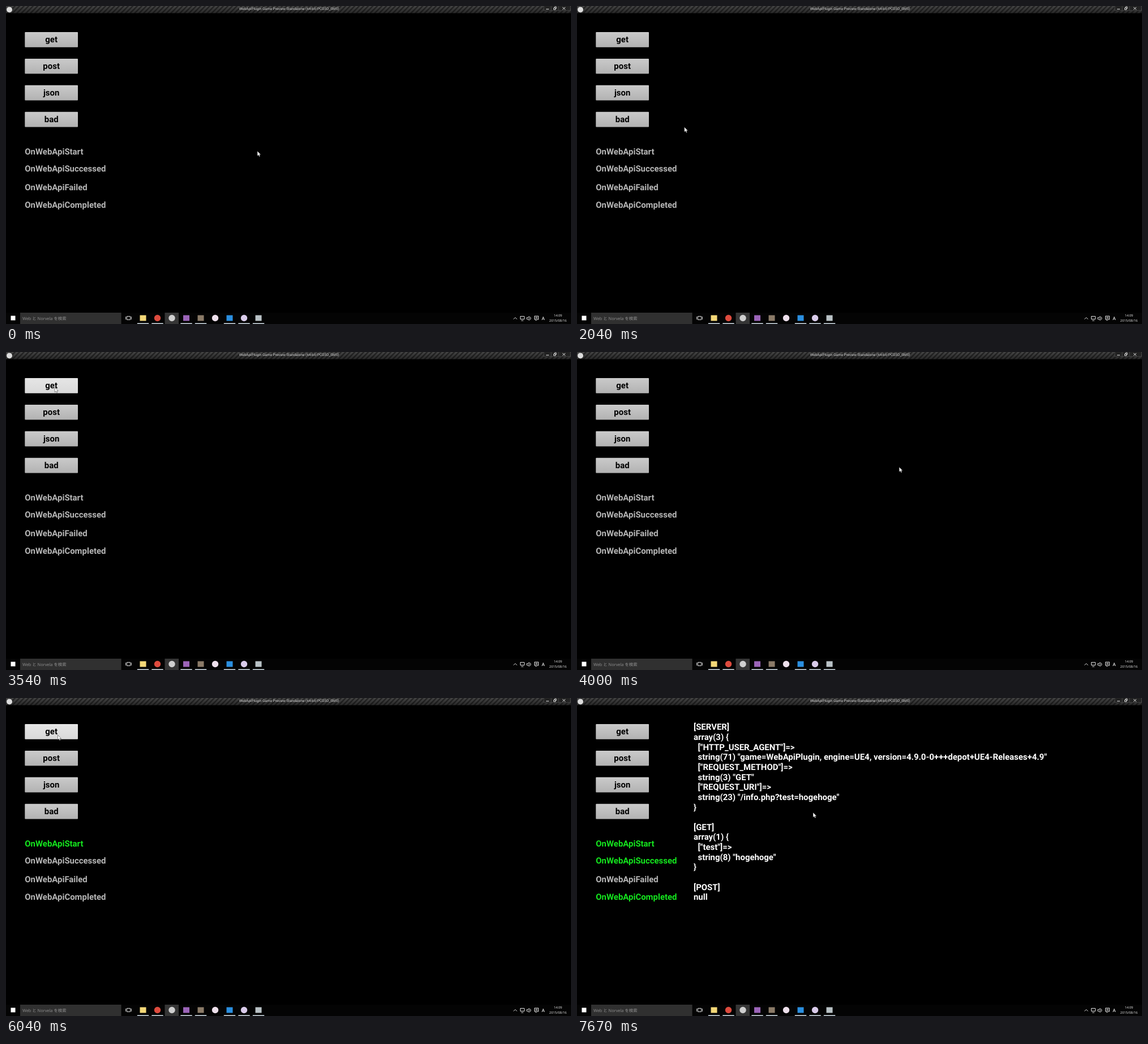
These frames come from a looping animation (998x561 px, 8000 ms). An HTML page:

```html
<!DOCTYPE html>
<html lang="ja">
<head>
<meta charset="utf-8">
<title>Web API demo</title>
<style>
  html, body { margin: 0; width: 100%; height: 100%; overflow: hidden; background: #000; }
  svg { display: block; width: 100%; height: 100%; text-rendering: geometricPrecision; }
  text { white-space: pre; }
  .ui { font: 700 14.94px Roboto, sans-serif; }
  .small { font: 5.8px "Open Sans", sans-serif; fill: #e8e8e8; }
  .line { fill: none; stroke: #ddd; stroke-width: 1; }
</style>
</head>
<body>
<svg id="stage" viewBox="0 0 998 561">
  <defs>
    <linearGradient id="normal" x2="0" y2="1">
      <stop stop-color="#cacaca"/><stop offset="1" stop-color="#b2b2b2"/>
    </linearGradient>
    <linearGradient id="hover" x2="0" y2="1">
      <stop stop-color="#e6e6e6"/><stop offset="1" stop-color="#d9d9d9"/>
    </linearGradient>
    <linearGradient id="shade" x2="0" y2="1">
      <stop stop-color="#000" stop-opacity="0"/><stop offset="1" stop-color="#000" stop-opacity=".4"/>
    </linearGradient>
    <pattern id="hatch" width="8" height="8" patternUnits="userSpaceOnUse">
      <rect width="8" height="8" fill="#444"/>
      <path d="M-1 9L9 -1M-1 1L1 -1M7 9L9 7" stroke="#262626" stroke-width="2.6"/>
    </pattern>
  </defs>
  <rect width="998" height="561"/>

  <rect width="998" height="12.5" fill="url(#hatch)"/>
  <rect width="998" height="12.5" fill="url(#shade)"/>
  <circle cx="6" cy="6.5" r="5" fill="#ddd"/>
  <text x="500" y="6.8" text-anchor="middle" font-family="Roboto, sans-serif" font-size="6.4" fill="#d0d0d0">WebApiPlugin Game Preview Standalone (64-bit/PCD3D_SM5)</text>
  <path d="M950 0V8H997V0M963 0V8M976 0V8" fill="#222" stroke="#555" stroke-width=".7"/>
  <path class="line" d="M954 5.5h5M967.5 3.5h3v3h-3zM969 3v-1.5h3v3h-1M983 2l5 4.5M988 2l-5 4.5"/>

  <g id="buttons"></g>
  <g id="labels"></g>
  <g id="response" class="ui" fill="#fff"></g>

  <rect y="541" width="998" height="20" fill="#040404"/>
  <rect x="25" y="541" width="178.5" height="20" fill="#303030"/>
  <rect x="8.5" y="546.5" width="8" height="8" fill="#fff"/>
  <text x="29" y="553.7" font-family="'Open Sans', 'Noto Sans CJK JP', 'Noto Sans CJK', sans-serif" font-size="7.4" fill="#929292">Web と Norvela を検索</text>
  <path class="line" d="M213.5 547.5h6v6h-6zM211.5 548v5M221.5 548v5"/>
  <rect x="280.5" y="541" width="24.5" height="20" fill="#363636"/>
  <g id="apps"></g>
  <path class="line" d="M896.5 552.5l3 -3l3 3M908.5 547.5h7v5h-7zM910 555h4M920 549.5h2l2 -2v7l-2 -2h-2zM926 548.5q2 2.5 0 5M933.5 547h7v6h-3l-1.5 2v-2h-2.5zM935 549h4M935 551h4"/>
  <text class="small" x="949" y="553.6" text-anchor="middle" style="font-size:8px;font-weight:600">A</text>
  <text class="small" x="975" y="548.2" text-anchor="middle">14:09</text>
  <text class="small" x="975" y="557.3" text-anchor="middle">2015/08/16</text>

  <path id="cursor" d="M0 0V8.6L2 6.8L3.3 9.8L4.8 9.1L3.5 6.3H6.1Z" fill="#fff" stroke="#222" stroke-width=".5"/>
</svg>
<script>
const DURATION = 8000, START_AT = 5630, RESPONSE_AT = 7630;
const GREY = '#b6b6b6', GREEN = '#14e61e';
const BUTTON = { x: 33.3, y: 46, width: 93.7, height: 26.7, step: 46.9 };

// time, x, y of the pointer tip
const POINTER = [
  [0, 444, 256], [1710, 444, 256], [1880, 320, 240], [2040, 190, 214], [2250, 118, 130],
  [2460, 85, 64], [2500, 83, 58], [2540, 89, 57], [2580, 92, 56], [2790, 92, 56],
  [2830, 76, 54], [3040, 76, 54], [3170, 85, 62], [3540, 85, 62], [3760, 330, 150],
  [4000, 569, 203], [4170, 590, 204], [4380, 590, 204], [4760, 330, 150], [5000, 150, 90],
  [5170, 90, 73], [5330, 91, 66], [5710, 91, 65], [6040, 91, 65], [6400, 250, 150],
  [6830, 417, 202], [DURATION, 417, 202]
];
const RESPONSE = `[SERVER]
array(3) {
  ["HTTP_USER_AGENT"]=>
  string(71) "game=WebApiPlugin, engine=UE4, version=4.9.0-0+++depot+UE4-Releases+4.9"
  ["REQUEST_METHOD"]=>
  string(3) "GET"
  ["REQUEST_URI"]=>
  string(23) "/info.php?test=hogehoge"
}

[GET]
array(1) {
  ["test"]=>
  string(8) "hogehoge"
}

[POST]
null`;

const $ = id => document.getElementById(id);
function add(parent, tag, attrs, text = '') {
  const node = document.createElementNS('http://www.w3.org/2000/svg', tag);
  for (const key in attrs) node.setAttribute(key, attrs[key]);
  node.textContent = text;
  return $(parent).appendChild(node);
}

const buttons = ['get', 'post', 'json', 'bad'].map((name, i) => {
  const { x, width, height } = BUTTON, y = BUTTON.y + i * BUTTON.step;
  const box = add('buttons', 'rect', { x, y, width, height, rx: 1 });
  add('buttons', 'text', { class: 'ui', x: x + width / 2, y: y + 18.3, 'text-anchor': 'middle' }, name);
  return { box, y };
});

const labels = [
  ['OnWebApiStart', 262.4, START_AT],
  ['OnWebApiSuccessed', 292, RESPONSE_AT],
  ['OnWebApiFailed', 325.4, Infinity],
  ['OnWebApiCompleted', 356.4, RESPONSE_AT]
].map(([name, y, litAt]) => ({ litAt, node: add('labels', 'text', { class: 'ui', x: 33.3, y }, name) }));

RESPONSE.split('\n').forEach((line, i) => add('response', 'text', { x: 206, y: 56.3 + i * 17.65 }, line));

// colour, shape, running
[
  ['#f3d878', 'square', true], ['#dd4b3e', 'circle', true], ['#cfcfcf', 'circle', false],
  ['#9b64b8', 'square', true], ['#8b7b68', 'square', true], ['#eee0ec', 'circle', false],
  ['#2a8fe0', 'square', true], ['#d9cbea', 'circle', true], ['#b9c2c6', 'square', true]
].forEach(([fill, shape, running], i) => {
  const x = 242 + i * 25.5;
  if (shape === 'circle') add('apps', 'circle', { cx: x, cy: 550.5, r: 5.7, fill });
  else add('apps', 'rect', { x: x - 5.5, y: 545.5, width: 11, height: 10, fill });
  if (running) add('apps', 'rect', { x: x - 10.2, y: 559.4, width: 20.4, height: 1.6, fill: '#c8d4dc' });
});

function pointerAt(time) {
  const next = POINTER.findIndex(key => key[0] > time);
  const [t0, x0, y0] = POINTER[next - 1], [t1, x1, y1] = POINTER[next];
  const k = (time - t0) / (t1 - t0);
  return [x0 + (x1 - x0) * k, y0 + (y1 - y0) * k];
}

function draw(now) {
  const time = now % DURATION;
  const [x, y] = pointerAt(time);
  $('cursor').setAttribute('transform', `translate(${x} ${y})`);
  for (const button of buttons) {
    const over = x >= BUTTON.x && x <= BUTTON.x + BUTTON.width && y >= button.y && y <= button.y + BUTTON.height + 1;
    button.box.setAttribute('fill', over ? 'url(#hover)' : 'url(#normal)');
  }
  for (const { node, litAt } of labels) node.setAttribute('fill', time >= litAt ? GREEN : GREY);
  $('response').setAttribute('visibility', time >= RESPONSE_AT ? 'visible' : 'hidden');
}

const begin = performance.now();
function frame() {
  draw(performance.now() - begin);
  requestAnimationFrame(frame);
}
frame();
</script>
</body>
</html>
```
